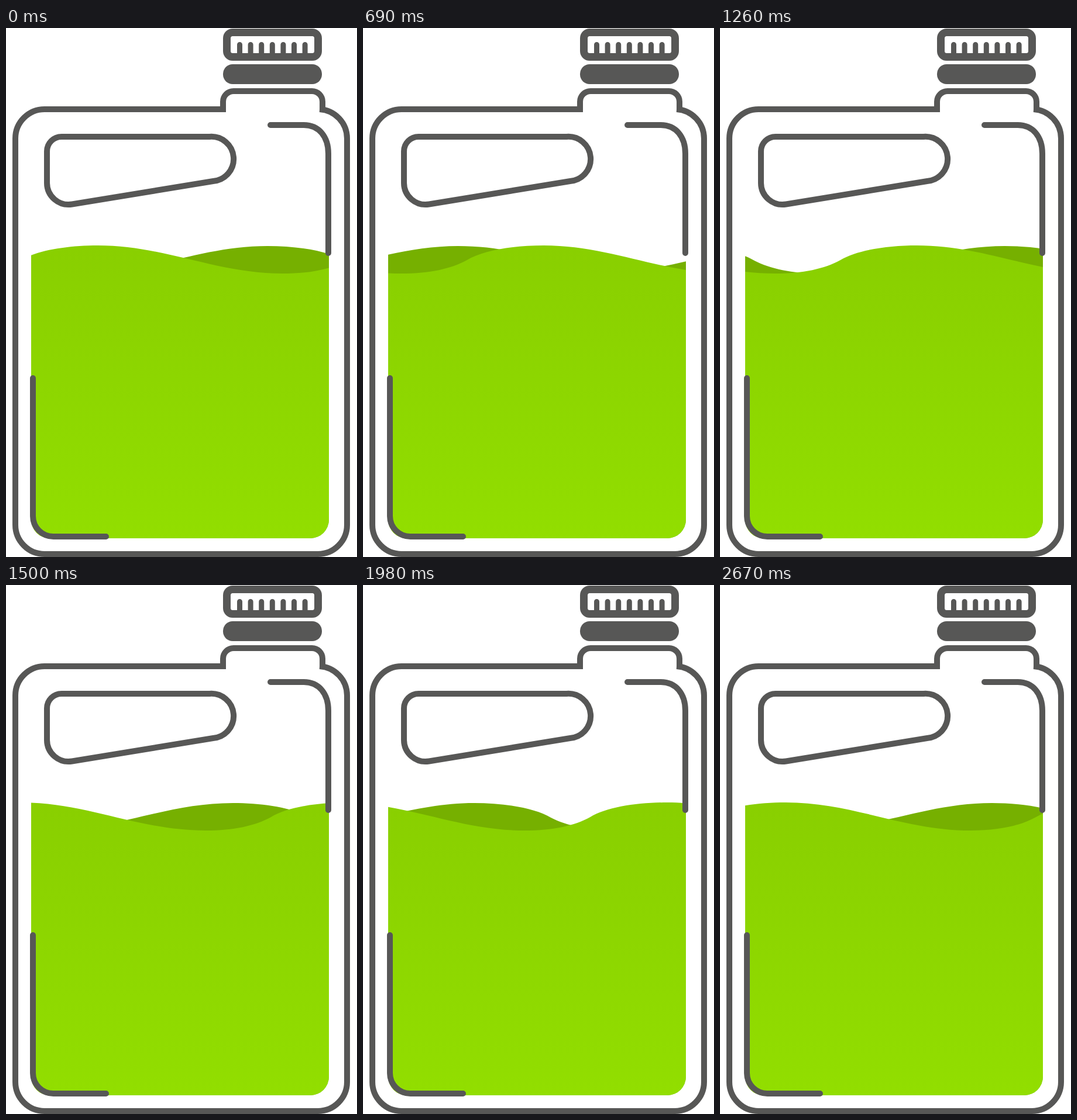
Write an HTML page that moves like this. It is 600 px wide and 905 px high and loops after 2.7 s.

```html
<!DOCTYPE html>
<html lang="en">
<head>
<meta charset="utf-8">
<title>Canister</title>
<style>
  html, body { margin: 0; height: 100%; overflow: hidden; background: #fff; }
  svg { display: block; width: 600px; height: 905px; }
  .line { fill: none; stroke: #575756; stroke-width: 10; }
  .round { stroke-linecap: round; }
</style>
</head>
<body>
<svg viewBox="0 0 600 905">
  <defs>
    <linearGradient id="green" gradientUnits="userSpaceOnUse" x1="0" y1="372" x2="0" y2="873">
      <stop stop-color="#89cf00"/>
      <stop offset="1" stop-color="#92de00"/>
    </linearGradient>
    <clipPath id="tank">
      <path d="M43 360H552V841a32 32 0 0 1-32 32H75a32 32 0 0 1-32-32Z"/>
    </clipPath>
  </defs>

  <g clip-path="url(#tank)">
    <path id="back" fill="#76b000"/>
    <path id="front" fill="url(#green)"/>
  </g>

  <g class="line">
    <path d="M376 139H66A50 50 0 0 0 16 189V850A50 50 0 0 0 66 900H533A50 50 0 0 0 583 850V189A50 50 0 0 0 536 139"/>
    <path d="M371 144V126A18 18 0 0 1 389 108H523A18 18 0 0 1 541 126V144"/>
    <path d="M95 186H348A38 38 0 0 1 354 262L113 301.5A37 37 0 0 1 70 265V211A25 25 0 0 1 95 186Z"/>
    <path class="round" d="M452 166H509C535 166 551 186 551 215V385"/>
    <path class="round" d="M46 599V835A35 35 0 0 0 81 870H171"/>
    <rect x="377.5" y="7.5" width="156" height="42" rx="10" stroke-width="13" style="stroke-width:13"/>
    <path id="teeth" class="round" style="stroke-width:9"/>
  </g>
  <rect x="371" y="62" width="169" height="34" rx="16.5" fill="#575756"/>
</svg>
<script>
  const LOOP = 2700, STEP = 30;
  const WAVE = 559;            // length of one wave
  const CYCLE = 90.45 * STEP;  // 5 front waves and 2 back waves pass in this time
  const get = id => document.getElementById(id);

  // Three wave lengths, starting at a crest one length left of zero
  const wave = (top, period) => `M${-WAVE} ${top}${period.repeat(3)}V900H${-WAVE}Z`;
  get('front').setAttribute('d', wave(372, 'c115 0 201 48 316 48c48 0 85-8 112-23c28-17 80-25 131-25'));
  get('back').setAttribute('d', wave(373, 'c51 0 103 8 131 25c27 14 64 22 112 22c115 0 201-47 316-47'));

  get('teeth').setAttribute('d',
    Array.from({ length: 7 }, (_, i) => `M${399.5 + i * 18.6} 28.5V46`).join(''));

  function slide(id, crest, waves, time) {
    const x = crest + waves * WAVE * time / CYCLE;
    get(id).setAttribute('transform', `translate(${(x % WAVE + WAVE) % WAVE} 0)`);
  }

  function draw(now) {
    const time = Math.floor(now % LOOP / STEP) * STEP;
    slide('front', 157, 5, time);
    slide('back', 447, -2, time);
    requestAnimationFrame(draw);
  }
  draw(0);
</script>
</body>
</html>
```
